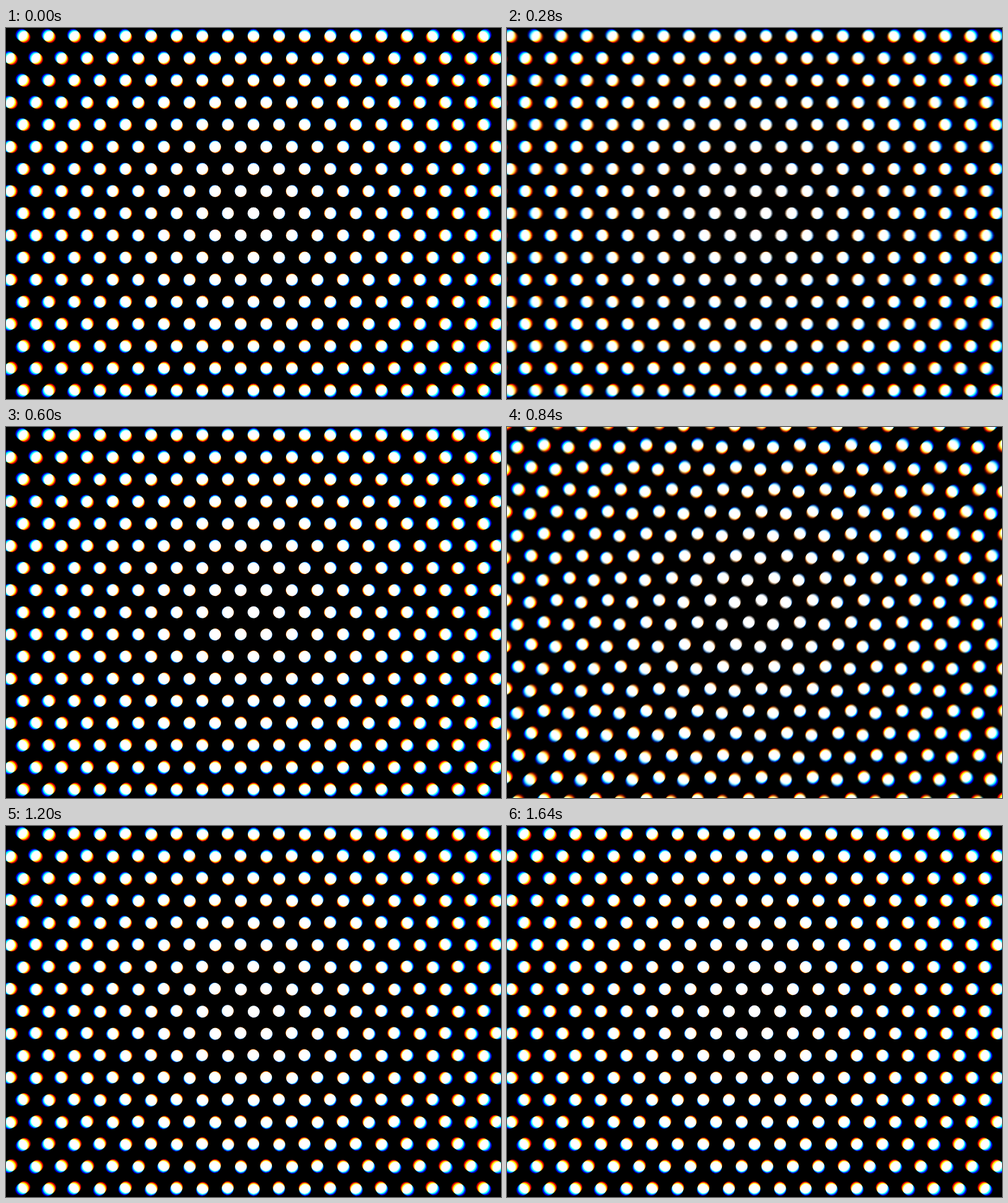
Animation, 700 px wide and 525 px high, one loop 1680 ms. Source, as an HTML page with a canvas:

```html
<!DOCTYPE html>
<html>
<head>
<meta charset="utf-8">
<style>
  html, body { margin: 0; width: 100%; height: 100%; overflow: hidden; background: #000; }
  canvas { display: block; }
</style>
</head>
<body>
<canvas id="stage" width="700" height="525"></canvas>
<script>
const ctx = document.getElementById('stage').getContext('2d');
const STEP = 40, FRAMES = 42, PHASE = 14;
const GAP = 36.22, ROW = GAP * Math.sqrt(3) / 2, RADIUS = 8.4, REACH = 465;
const SAMPLES = 8, SHUTTER = 0.5;

// Each colour is magnified slightly differently, like a lens fringe
const channels = [
  { color: '#200000', spread: -0.0058 },
  { color: '#002000', spread: 0 },
  { color: '#000020', spread: 0.0058 }
];

const ease = p => p < 0.5 ? 4 * p ** 3 : 1 - 4 * (1 - p) ** 3;

// Neighbouring rows slide one gap in opposite directions
function dotGrid(progress) {
  const path = new Path2D();
  const slide = GAP * ease(progress);
  for (let row = -15; row <= 15; row++) {
    const odd = Math.abs(row) % 2;
    const offset = odd ? GAP / 2 + slide : -slide;
    for (let col = -15; col <= 15; col++) {
      const x = col * GAP + offset, y = row * ROW;
      if (Math.hypot(x, y) > REACH) continue;
      path.moveTo(x + RADIUS, y);
      path.arc(x, y, RADIUS, 0, 2 * Math.PI);
    }
  }
  return path;
}

function draw(frame) {
  const angle = Math.floor(frame / PHASE) * 2 * Math.PI / 3;
  ctx.resetTransform();
  ctx.globalCompositeOperation = 'source-over';
  ctx.fillStyle = '#000';
  ctx.fillRect(0, 0, 700, 525);
  ctx.globalCompositeOperation = 'lighter';
  for (let i = 0; i < SAMPLES; i++) {
    const moment = frame % PHASE + (i + 0.5) / SAMPLES * SHUTTER;
    const dots = dotGrid(moment / PHASE);
    const jitter = ((i * 3 % SAMPLES + 0.5) / SAMPLES - 0.5) * 0.005;
    for (const { color, spread } of channels) {
      const zoom = 1 + spread + jitter;
      ctx.setTransform(zoom, 0, 0, zoom, 350, 262.2);
      ctx.rotate(angle);
      ctx.fillStyle = color;
      ctx.fill(dots);
    }
  }
}

let shown = -1;
function tick() {
  const frame = Math.floor(performance.now() / STEP) % FRAMES;
  if (frame !== shown) draw(shown = frame);
  requestAnimationFrame(tick);
}
tick();
</script>
</body>
</html>
```
